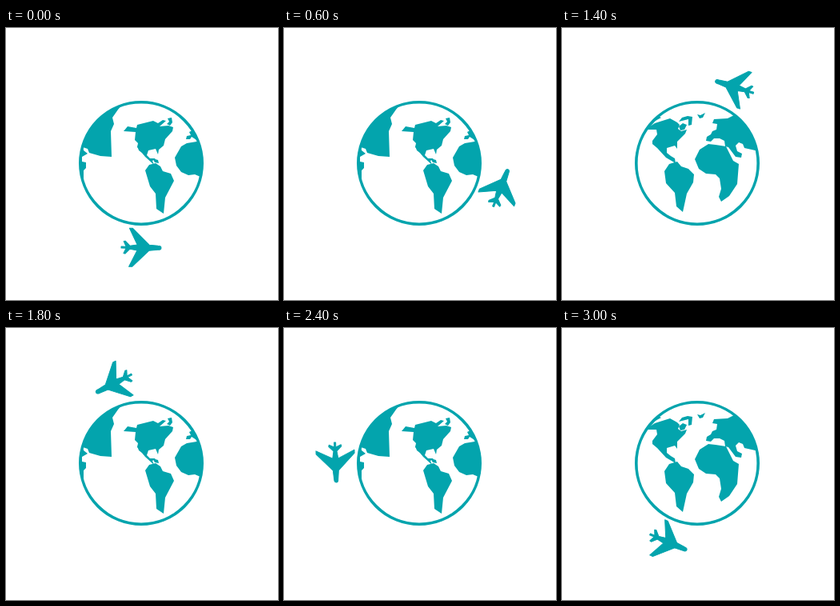
These frames come from a looping animation (340x340 px, 3200 ms). An HTML page:

```html
<!DOCTYPE html>
<html lang="en">
<head>
<meta charset="utf-8">
<title>Plane around the globe</title>
<style>
  html, body { margin: 0; width: 100%; height: 100%; overflow: hidden; background: #fff; }
  svg { display: block; width: 100vw; height: 100vh; fill: #03a4ad; }
</style>
</head>
<body>
<svg viewBox="0 0 340 340">
  <clipPath id="disc"><circle cx="169" cy="169" r="77"/></clipPath>
  <g clip-path="url(#disc)">
    <!-- Americas -->
    <g class="view">
      <path d="M150 90L140 102 133 112 135 120 131 129 132 161 118 160 104 156 102 151 96 149 97 153 102 157 95 161 95 167 100 168 100 175 97 178 97 200H80V90z"/>
      <path d="M147 129L152 123 163 125 164 121 184 116 190 119 196 115 200 116 192 123 203 122 209 124 208 129 199 139 197 147 191 152 190 158 187 151 178 153 176 159 180 163 187 163 183 166 185 171 174 161 164 149 165 144 161 140 162 130z"/>
      <path d="M202 113L207 112 208 118 205 122 201 120 204 117zM164 147L168 150 170 156 166 153zM183 163L190 165 191 169 186 168z"/>
      <path d="M174 178L179 171 187 169 193 173 196 179 206 182 210 191 199 212 197 232 188 226 187 207 180 198z"/>
      <path d="M250 140L226 144 219 148 211 162 213 172 219 180 228 184 236 183 250 189z"/>
      <path d="M225 139L226 135 231 134 229 130 233 128 238 135 243 143 232 136 230 139z"/>
    </g>
    <!-- Atlantic and Africa -->
    <g class="view">
      <path d="M104 127L116 119 135 113 144 118 147 121 145 126 149 129 156 127 154 132 144 142 144 151 141 147 131 150 131 156 136 160 141 163 142 169 130 162 119 150 113 145 113 141 119 133 118 127z"/>
      <path d="M100 125L115 108 124 112zM146 123L151 119 156 121 153 127 148 128zM146 117L150 112 157 110 163 111 162 121 158 122 158 114z"/>
      <path d="M128 179L134 170 144 167 149 173 158 176 165 183 164 193 156 207 151 230 143 223 141 206 130 194z"/>
      <path d="M166 164L172 152 183 145 192 146 205 148 214 166 221 170 219 195 209 210 199 217 196 211 199 201 197 188 192 183 180 182 171 176z"/>
      <path d="M169 108L173 109 179 106 176 112 172 113z"/>
      <path d="M180 141L181 136 186 133 188 129 193 127 194 120 188 119 190 114 207 113 215 109 217 102 250 120V155L228 150 226 145 221 143 217 147 219 154 225 157 224 162 217 161 208 149 204 148 203 141 197 138 190 138 186 142z"/>
    </g>
    <!-- Asia and Oceania -->
    <g class="view">
      <path d="M100 141L108 122 134 112 168 97 212 109 231 126 221 129 210 140 208 150 194 163 196 173 190 170 181 159 172 177 166 165 149 154 146 163 137 169 129 154z"/>
      <path d="M85 149L104 148 120 153 130 169 139 171 130 184 127 201 109 214 85 180z"/>
      <path d="M202 197L222 187 230 195 233 207 225 217 216 212 204 213z"/>
      <path d="M185 174L198 185 194 187zM201 174L208 170 209 179 203 181zM219 180L237 188 226 187z"/>
    </g>
  </g>
  <circle cx="169" cy="169" r="76.2" fill="none" stroke="#03a4ad" stroke-width="3.6"/>
  <path id="plane" stroke="#03a4ad" stroke-linejoin="round" d="M20-2.5Q24-2.5 24 0 24 2.5 20 2.5L9 3.5-12 24-16 24-6 3.5-15 2-21 8-23 7.5-20 1-26 1-26-1-20-1-23-7.5-21-8-15-2-6-3.5-16-24-12-24 9-3.5z"/>
</svg>
<script>
  const STEPS = 16, STEP = 200, RADIUS = 105.5;
  const views = [...document.querySelectorAll('.view')];
  const plane = document.getElementById('plane');

  function draw() {
    const step = Math.floor(performance.now() / STEP) % STEPS;
    const turn = step / STEPS * 2 * Math.PI;
    const cos = Math.cos(turn), sin = Math.sin(turn);

    // Counterclockwise from the bottom, running ahead below and lagging above
    const orbit = turn + 0.32 * cos * sin * sin;
    const x = 170 + RADIUS * Math.sin(orbit);
    const y = 169 + RADIUS * Math.cos(orbit);
    const heading = 360 * step / STEPS + 2 - 3 * cos;
    plane.setAttribute('transform', `translate(${x} ${y}) rotate(${-heading})`);

    // The globe cycles through its views; the last step swings back to the second
    const shown = step === STEPS - 1 ? 1 : step % views.length;
    views.forEach((view, i) => view.style.display = i === shown ? '' : 'none');
    requestAnimationFrame(draw);
  }
  draw();
</script>
</body>
</html>
```
